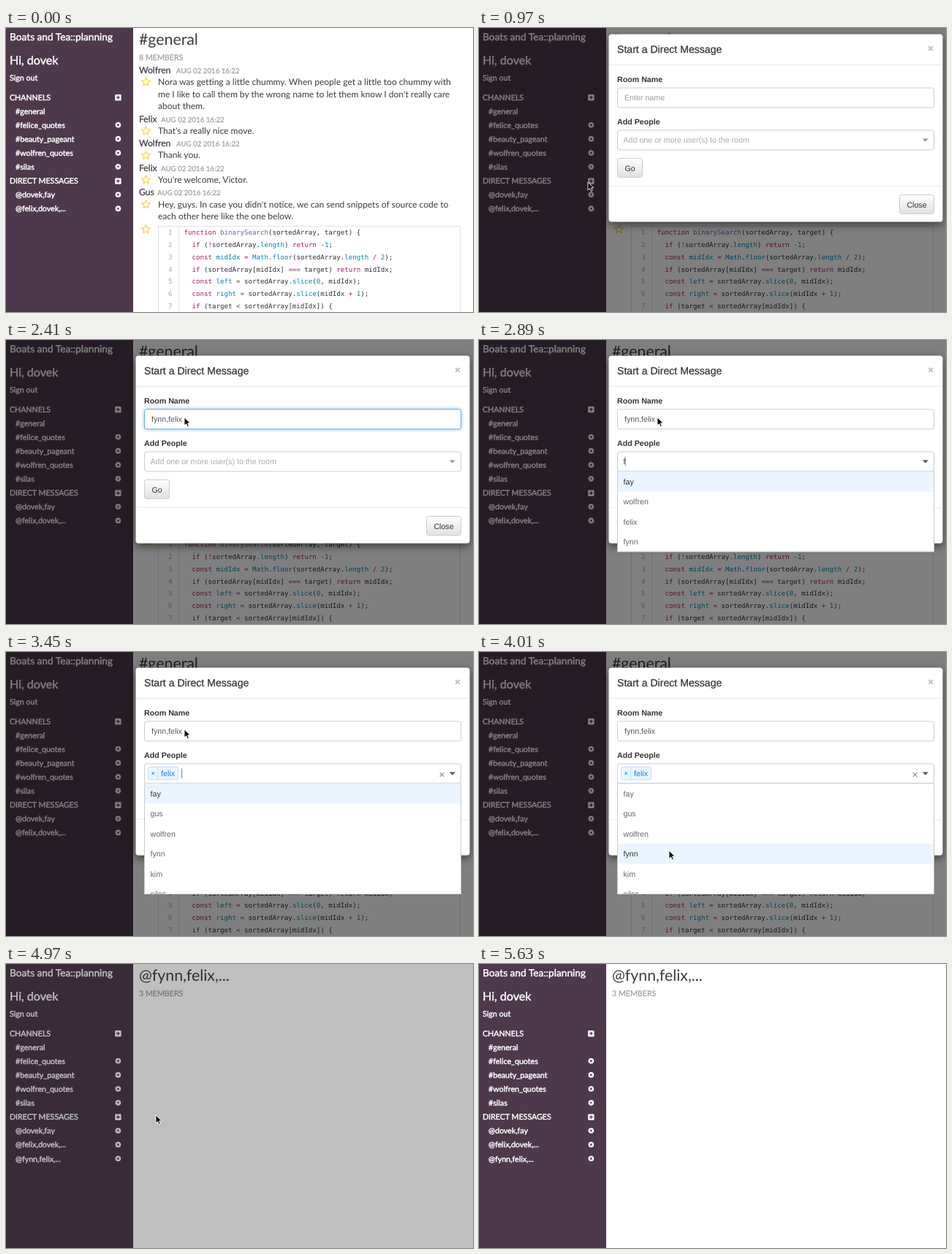
An HTML page for the animation above (5880 ms loop, 639x389 px).

```html
<!DOCTYPE html>
<html lang="en">
<head>
<meta charset="utf-8">
<title>Direct message demo</title>
<style>
html, body { margin: 0; width: 100%; height: 100%; overflow: hidden; background: #fff; }
svg { display: block; width: 639px; height: 389px; }
text { white-space: pre; font-variant-ligatures: none; text-rendering: geometricPrecision; }
.lato { font-family: Lato, sans-serif; }
.sans { font-family: "Liberation Sans", Arial, sans-serif; }
.mono { font-family: "DejaVu Sans Mono", monospace; font-size: 9.14px; }
.side text { fill: #fff; stroke: #fff; stroke-width: .45px; }
.firm { stroke: currentColor; stroke-width: .25px; }
.glow { filter: drop-shadow(0 0 2.5px rgba(102, 175, 233, .8)); }
.lift { filter: drop-shadow(0 4px 6px rgba(0, 0, 0, .5)); }
</style>
</head>
<body>
<svg id="stage" viewBox="0 0 639 389" xmlns="http://www.w3.org/2000/svg"></svg>
<script>
const LOOP = 5880, SMALL = 10.67, ROW = 27.5;
const people = ['fay', 'gus', 'wolfren', 'felix', 'fynn', 'kim', 'silas'];
const stage = document.getElementById('stage');

// Each step lists only what changes: [ms, changes]
const steps = [
  [0, { mouse: null, beam: false, shift: 0, fade: 0, dim: 0, room: '', focus: '', query: '', caret: false, picks: [], open: false, done: false }],
  [160, { mouse: [262, 114] }],
  [240, { mouse: [256, 121] }],
  [320, { mouse: [237, 140] }],
  [400, { mouse: [206, 167] }],
  [480, { mouse: [175, 192] }],
  [560, { mouse: [156, 206] }],
  [640, { mouse: [149, 211] }],
  [970, { shift: -13, fade: 1, dim: .5 }],
  [1050, { shift: -3 }],
  [1130, { shift: 0 }],
  [1210, { mouse: [160, 197] }],
  [1290, { mouse: [185, 179] }],
  [1370, { mouse: [206, 164] }],
  [1530, { mouse: [212, 150] }],
  [1610, { mouse: [219, 125] }],
  [1690, { mouse: [224, 102], beam: true }],
  [1850, { mouse: null }],
  [1930, { mouse: [224, 102] }],
  [2090, { focus: 'room' }],
  [2170, { room: 'f', mouse: [244, 106], beam: false }],
  [2250, { room: 'fynn' }],
  [2330, { room: 'fynn,fe' }],
  [2410, { room: 'fynn,felix' }],
  [2570, { focus: 'select' }],
  [2650, { caret: true }],
  [2810, { focus: '', open: true, query: 'f' }],
  [3050, { query: 'fe' }],
  [3130, { query: 'fel' }],
  [3210, { query: 'felix' }],
  [3370, { query: '', picks: ['felix'] }],
  [3530, { caret: false }],
  [3690, { mouse: [245, 118] }],
  [3770, { mouse: [249, 160] }],
  [3850, { mouse: [255, 213] }],
  [3930, { mouse: [259, 254] }],
  [4010, { mouse: [260, 272] }],
  [4170, { picks: ['felix', 'fynn'], mouse: [261, 262] }],
  [4250, { mouse: [264, 232] }],
  [4330, { mouse: [266, 192] }],
  [4410, { mouse: [265, 160] }],
  [4490, { mouse: [263, 146] }],
  [4570, { open: false, mouse: [251, 165] }],
  [4650, { mouse: [224, 195] }],
  [4730, { mouse: [205, 207] }],
  [4810, { fade: .6, shift: -4 }],
  [4890, { fade: 0, done: true }],
  [4970, { dim: .25 }],
  [5050, { dim: 0 }],
  [5550, { mouse: [348, 48] }],
  [5630, { mouse: null }]
];
const states = [];
steps.reduce((prev, [, change]) => {
  const next = { ...prev, ...change };
  states.push(next);
  return next;
}, {});

const esc = s => s.replace(/&/g, '&amp;').replace(/</g, '&lt;');
const text = (x, y, s, size, fill = '#3d3c40', extra = '') =>
  `<text x="${x}" y="${y}" font-size="${size}" fill="${fill}" ${extra}>${esc(s)}</text>`;
const firm = (x, y, s, size, color) => text(x, y, s, size, color, `class="firm" color="${color}"`);
const rect = (x, y, w, h, fill, extra = '') =>
  `<rect x="${x}" y="${y}" width="${w}" height="${h}" fill="${fill}" ${extra}/>`;
const path = (d, extra) => `<path d="${d}" ${extra}/>`;
const cross = (x, y, r, color, w) =>
  path(`M${x - r} ${y - r}l${2 * r} ${2 * r}m0 ${-2 * r}l${-2 * r} ${2 * r}`, `stroke="${color}" stroke-width="${w}" fill="none"`);

const plusIcon = y => rect(149.2, y - 4, 8.4, 8.4, '#fff', 'rx="1.2"') +
  path(`M151 ${y + .2}h4.8m-2.4 -2.4v4.8`, 'stroke="#4d394b" stroke-width="1.3"');
const closeIcon = y => `<circle cx="153.4" cy="${y}" r="3.8" fill="#fff"/>` + cross(153.4, y, 1.3, '#4d394b', 1.1);

function sidebar(done) {
  const row = (s, y, closable = true) => text(13, y + 4, s, SMALL) + (closable ? closeIcon(y) : '');
  const rooms = ['#general', '#felice_quotes', '#beauty_pageant', '#wolfren_quotes', '#silas'];
  const chats = ['@dovek,fay', '@felix,dovek,...'];
  if (done) chats.push('@fynn,felix,...');
  return '<g class="lato side">' + rect(0, 0, 174, 389, '#4d394b') +
    text(5, 17.3, 'Boats and Tea::planning', 13.7) +
    text(5, 50, 'Hi, dovek', 16.1) +
    text(5, 72, 'Sign out', SMALL) +
    text(5, 98.5, 'CHANNELS', SMALL) + plusIcon(95) +
    rooms.map((s, i) => row(s, 113.7 + 19.1 * i, i > 0)).join('') +
    text(5, 213, 'DIRECT MESSAGES', SMALL) + plusIcon(209.5) +
    chats.map((s, i) => row(s, 228.3 + 19.1 * i)).join('') + '</g>';
}

function star(y) {
  const pts = Array.from({ length: 10 }, (_, i) => {
    const r = i % 2 ? 2.7 : 6.2, a = i * Math.PI / 5;
    return (191.5 + r * Math.sin(a)).toFixed(1) + ',' + (y - r * Math.cos(a)).toFixed(1);
  });
  return `<polygon points="${pts.join(' ')}" fill="none" stroke="#fbd12c" stroke-width="1.1" stroke-linejoin="round"/>`;
}

const code = [
  'function binarySearch(sortedArray, target) {',
  '  if (!sortedArray.length) return -1;',
  '  const midIdx = Math.floor(sortedArray.length / 2);',
  '  if (sortedArray[midIdx] === target) return midIdx;',
  '  const left = sortedArray.slice(0, midIdx);',
  '  const right = sortedArray.slice(midIdx + 1);',
  '  if (target < sortedArray[midIdx]) {'
];
const token = /(\b(?:function|const|if|return)\b|[!=<+\/-]+)|(\b(?:Math|floor|length|slice|\d)\b|(?<=const )\w+)|(binarySearch)|[^]/g;
const paint = line => line.replace(token, (s, key, name, def) => {
  const color = key ? '#a71d5d' : name ? '#0086b3' : def ? '#795da3' : '';
  return color ? `<tspan fill="${color}">${esc(s)}</tspan>` : esc(s);
});
const snippet = rect(208.5, 271.5, 413, 130, '#fff', 'stroke="#e2e2e2"') +
  rect(236, 272, .8, 120, '#e2e2e2') +
  '<g class="mono" fill="#333">' + code.map((line, i) => {
    const y = 283.3 + 16.77 * i;
    return `<text x="227.5" y="${y}" text-anchor="end" fill="#aaa">${i + 1}</text><text x="243.5" y="${y}">${paint(line)}</text>`;
  }).join('') + '</g>';

const posts = [
  ['Wolfren', 233, 61.5, ['Nora was getting a little chummy. When people get a little too chummy with',
    "me I like to call them by the wrong name to let them know I don't really care", 'about them.']],
  ['Felix', 212, 128.5, ["That's a really nice move."]],
  ['Wolfren', 233, 162, ['Thank you.']],
  ['Felix', 212, 195.5, ["You're welcome, Victor."]],
  ['Gus', 207, 229.3, ["Hey, guys. In case you didn't notice, we can send snippets of source code to", 'each other here like the one below.']]
];
const heading = (title, count) => text(182, 23, title, 21.3) + firm(182, 44.3, count + ' MEMBERS', SMALL, '#9e9ea6');
const general = heading('#general', 8) + posts.map(([who, x, y, lines]) =>
  firm(182, y, who, 12.2, '#3d3c40') + firm(x, y, 'AUG 02 2016 16:22', 9.7, '#9e9ea6') + star(y + 12.5) +
  lines.map((s, i) => text(208, y + 16.3 + 16.8 * i, s, 12.05)).join('')).join('') + star(275.7) + snippet;
const direct = heading('@fynn,felix,...', 3);

const button = (x, y, w, label) => rect(x, y, w, 26, 'url(#metal)', 'rx="3" stroke="#ccc"') +
  text(x + w / 2, y + 17, label, SMALL, '#333', 'text-anchor="middle"');
const chip = (x, w, s) => rect(x, 157.5, w, 17.5, '#ebf5ff', 'rx="1.5" stroke="#c2e0ff"') +
  path(`M${x + 13} 157.5v17.5`, 'stroke="#c2e0ff"') + cross(x + 6.7, 166.2, 1.9, '#007eff', 1) +
  text(x + 13 + (w - 13) / 2, 170, s, SMALL, '#007eff', 'text-anchor="middle"');

function roomField({ focus, room }) {
  const on = focus === 'room';
  return rect(189.5, 95, 433, 27, '#fff', `rx="3" stroke="${on ? '#66afe9' : '#ccc'}" ${on ? 'class="glow"' : ''}`) +
    text(199, 112.3, room || 'Enter name', SMALL, room ? '#555' : '#999');
}

function selectField({ focus, picks, query, caret, open }) {
  const on = focus === 'select';
  const x = [197.5, 240.5, 289][picks.length];
  const typed = query && text(x, 170, query, SMALL, '#333');
  const caretX = x + [...query].reduce((w, c) => w + ('fil'.includes(c) ? 2.7 : 5.7), 0);
  return rect(189.5, 153, 433, 27, '#fff', `rx="3" stroke="${on ? '#5ab0de' : '#ccc'}" ${on ? 'class="glow"' : ''}`) +
    picks.map((s, i) => i ? chip(240.5, 42.5, s) : chip(194.5, 41, s)).join('') +
    (picks.length || query ? '' : text(197.5, 170.2, 'Add one or more user(s) to the room', SMALL, '#aaa')) + typed +
    (caret ? rect(caretX - .5, 159.5, 1, 13, '#4a90d9') : '') +
    (picks.length ? cross(596.5, 168, 2.8, '#888', 1.1) : '') +
    path('M606.8 164.6h8l-4 4.2z', `fill="${open ? '#555' : '#999'}"`);
}

function menu({ picks, query, mouse }) {
  const rows = people.filter(s => !picks.includes(s) && s.includes(query));
  const h = Math.min(rows.length * ROW, 151.5);
  const over = mouse[1] > 180 ? Math.floor((mouse[1] - 180) / ROW) : 0;
  const active = Math.min(over, rows.length - 1);
  return `<clipPath id="list"><rect x="190" y="180" width="432" height="${h}"/></clipPath>` +
    rect(189.5, 180, 433, h, '#fff', 'stroke="#ccc"') + '<g clip-path="url(#list)">' +
    rows.map((s, i) => (i === active ? rect(190, 180 + i * ROW, 432, ROW, '#ebf5ff') : '') +
      text(197.5, 197.6 + i * ROW, s, SMALL, i === active ? '#333' : '#666')).join('') + '</g>';
}

function modal(s) {
  if (!s.fade) return '';
  return `<g class="sans" opacity="${s.fade}" transform="translate(0 ${s.shift})">` +
    rect(177.5, 21.5, 457, 257, '#fff', 'rx="4" class="lift"') +
    firm(189, 47, 'Start a Direct Message', 14.1, '#333') +
    cross(618, 41, 2.9, '#bbb', 1.6) +
    rect(178, 63, 456, .8, '#e5e5e5') + rect(178, 229.3, 456, .8, '#e5e5e5') +
    text(189, 87, 'Room Name', SMALL, '#333', 'font-weight="700"') + roomField(s) +
    text(189, 145.3, 'Add People', SMALL, '#333', 'font-weight="700"') + selectField(s) +
    button(189.5, 191.5, 34, 'Go') + button(575.5, 241.5, 47, 'Close') +
    (s.open ? menu(s) : '') + '</g>';
}

function pointer({ mouse, beam }) {
  if (!mouse) return '';
  const shape = beam
    ? path('M-2 .5h1.5l.5 .5l.5 -.5h1.5M0 1v11M-2 12.5h1.5l.5 -.5l.5 .5h1.5', 'fill="none" stroke="#222" stroke-width=".9"')
    : path('M0 0V11L2.6 8.7L4.3 12.6L6.2 11.8L4.5 7.9H8Z', 'fill="#000" stroke="#fff" stroke-width=".9"');
  return `<g transform="translate(${mouse})">${shape}</g>`;
}

const defs = '<defs><linearGradient id="metal" x2="0" y2="1"><stop stop-color="#fff"/>' +
  '<stop offset="1" stop-color="#e0e0e0"/></linearGradient></defs>';

function draw(s) {
  stage.innerHTML = defs + rect(0, 0, 639, 389, '#fff') + sidebar(s.done) +
    `<g class="lato">${s.done ? direct : general}</g>` +
    (s.dim ? rect(0, 0, 639, 389, '#000', `opacity="${s.dim}"`) : '') + modal(s) + pointer(s);
}

let shown = -1;
function tick() {
  const t = performance.now() % LOOP;
  let i = steps.length - 1;
  while (steps[i][0] > t) i--;
  if (i !== shown) draw(states[shown = i]);
  requestAnimationFrame(tick);
}
tick();
</script>
</body>
</html>
```
